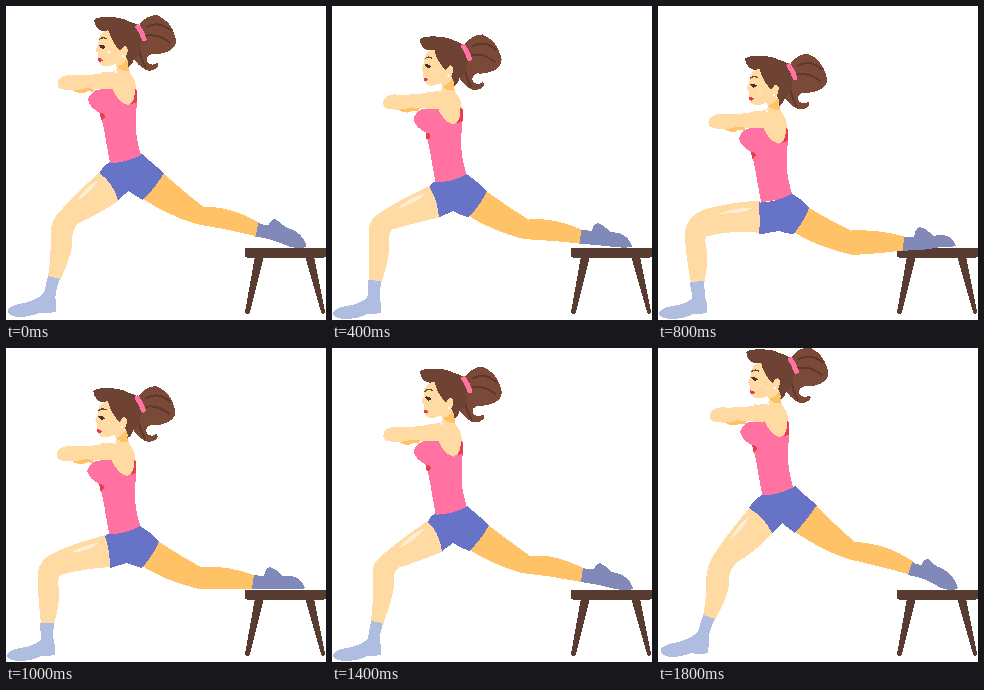
Recreate the animation shown at these times as an HTML page. Size 320 by 314 pixels, loop 2000 ms.

```html
<!DOCTYPE html>
<html>
<head>
<meta charset="utf-8">
<style>
  html, body { margin: 0; width: 100%; height: 100%; overflow: hidden; background: #fff; }
  svg { display: block; width: 320px; height: 314px; shape-rendering: crispEdges; }
</style>
</head>
<body>
<svg viewBox="0 0 320 314">
  <g fill="#583b31">
    <path d="M249 250H258L244 306Q241 310 239 306ZM299 250H308L319 306Q317 310 315 306Z"/>
    <rect x="238.500" y="242" width="81.500" height="9.500" rx="2"/>
  </g>
  <g id="legs"></g>
  <g id="torso">
    <path fill="#ffdaa3" d="M108 54L123 52Q121 64 126 70Q132 76 130 100L94 104L96 66Q110 68 111 62Z"/>
    <path fill="#ffc266" d="M112 60Q120 58 122 49L125 52Q122 62 123 65Q117 66 112 62Z"/>
    <path fill="#ff72a2" d="M90 84Q83 88 82 94Q84 102 94 107L95 111Q98 121 100 135L104 157Q120 157 135 149Q131 136 130 125Q129 110 131 96L130 83Q129 96 122 99Q112 97 106 82Z"/>
    <path fill="#e83e50" d="M129 83L131 84V96L125 98Q129 94 129 83ZM94 107Q99 107 99 111Q97 114 95 114Z"/>
    <path fill="#ffc266" d="M64 82L90 80L87 86Q82 84 78 87Q71 88 64 82Z"/>
    <path fill="#ffdaa3" d="M52 76Q52 71 62 69Q82 70 97 67Q107 65 116 65Q126 69 128 76L110 83Q96 84 80 82Q67 86 55 83Q50 80 52 76Z"/>
    <path fill="#7b4937" d="M134 18Q141 9 151 9Q165 15 169 30Q173 39 163 45Q154 49 146 48Q140 50 141 55Q145 61 151 57Q154 59 151 62Q146 66 140 64Q132 60 126 50L130 30Z"/>
    <path fill="none" stroke="#60382b" stroke-width="2" d="M140 21Q154 14 165 25M139 30Q153 27 164 37M133 38Q133 50 140 62"/>
    <path fill="#6f4333" d="M88 14Q90 11 102 11Q115 11 122 15Q131 18 135 21Q137 32 134 46Q132 52 128 52Q127 59 122 61Q124 56 118 49Q105 45 100 25Q90 26 88 14Z"/>
    <path fill="#ffdaa3" d="M99 25Q94 27 93 33Q93 38 90 43Q90 46 92 47Q91 55 95 59Q100 62 109 58Q119 55 121 48Q123 41 119 40L114 42Q106 32 105 23Z"/>
    <path fill="#6f4333" d="M98 21L108 21Q110 35 118 40L114 45Q105 35 103 25Z"/>
    <path fill="none" stroke="#744536" stroke-width="1.300" d="M93 34Q96 30 101 33"/>
    <path fill="#4b302c" d="M93 39Q97 38 100 41L97 43Q94 42 93 39Z"/>
    <path fill="#e8365c" d="M92 52Q95 52 97 54Q95 57 92 55Z"/>
    <path fill="none" stroke="#ff72a2" stroke-width="5" stroke-linecap="round" d="M132 21Q136 26 138 33"/>
    <g fill="#fff"><circle cx="117" cy="50" r="1.200"/><circle cx="110" cy="66" r="1"/><circle cx="103" cy="46" r=".8"/></g>
  </g>
</svg>
<script>
// Each part has one outline for the high, middle and low pose.
const parts = [
  ["#ffc266",
    "M140 150L158 157Q179 179 197 194Q228 195 256 214L250 226Q221 218 190 211Q163 202 137 184Z",
    "M138 170L156 177Q180 195 198 208Q222 205 251 220L249 234Q220 228 190 225Q161 217 136 201Z",
    "M135 190L152 193Q176 209 195 219Q220 217 248 227L247 241Q221 241 193 241Q157 232 135 217Z"],
  ["#8189b8",
    "M254 214Q260 217 264 217Q265 211 271 211Q276 218 283 220Q296 226 300 240Q296 244 283 240Q268 230 250 227Z",
    "M251 220Q258 222 262 221Q263 216 268 215Q274 218 280 224Q298 227 301 241Q296 243 283 241Q266 236 249 234Z",
    "M248 227Q254 228 258 228Q259 220 264 219Q270 221 277 228Q294 226 299 240Q296 242 283 241Q264 242 246 241Z"],
  ["#ffdaa3",
    "M93 158Q66 190 55 208Q49 217 48 232Q49 248 45 268L57 272Q72 245 71 232Q71 222 78 215Q97 204 116 184L112 160Z",
    "M97 172Q62 196 46 211Q40 217 41 226Q42 245 39 274L51 276Q61 250 62 237Q60 226 66 220Q88 213 112 203L114 180Z",
    "M100 187Q62 197 44 207Q34 212 32 224Q31 240 35 276L48 276Q54 255 53 241Q51 232 54 227Q80 220 106 219L110 195Z"],
  ["#ffeed6",
    "M72 192Q79 177 91 169Q85 182 72 192Z",
    "M67 200Q78 186 93 180Q84 193 67 200Z",
    "M64 205Q78 196 93 195Q84 203 64 205Z"],
  ["#aebde0",
    "M45 267L57 271Q49 287 51 294L50 305Q42 307 33 305Q24 309 12 309Q2 308 3 301Q6 296 21 294Q35 289 40 284Z",
    "M39 273L51 275Q46 292 49 297L49 307Q43 308 35 308Q26 313 12 313Q0 312 1 306Q4 301 20 299Q33 295 36 290Z",
    "M34 275L48 275Q46 292 49 297L49 307Q43 308 35 308Q26 313 12 313Q0 312 1 306Q4 301 20 299Q32 296 35 291Z"],
  ["#6673c6",
    "M105 146Q122 146 137 138Q145 146 159 157Q149 172 137 185Q130 180 124 175L114 185Q107 170 91 160Q96 152 105 146Z",
    "M104 165Q119 165 135 158Q145 166 157 177Q150 191 137 203Q129 200 121 195L110 203Q107 184 96 174Q98 168 104 165Z",
    "M103 186Q118 186 134 178Q143 183 153 193Q150 203 136 220Q128 218 121 215L104 220Q104 203 99 188Q100 186 103 186Z"]
];

const legs = document.getElementById("legs");
const torso = document.getElementById("torso");
const numbers = path => path.match(/\d+/g).map(Number);

const shapes = parts.map(([fill, ...poses]) => {
  const node = document.createElementNS("http://www.w3.org/2000/svg", "path");
  node.setAttribute("fill", fill);
  legs.append(node);
  return { node, template: poses[0], keys: poses.map(numbers) };
});

// The poses lie at depths 0, 2 and 4; the deepest one continues the last line.
function pose(depth) {
  const first = depth < 2 ? 0 : 1;
  const part = depth / 2 - first;
  for (const { node, template, keys } of shapes) {
    const from = keys[first], to = keys[first + 1];
    let i = 0;
    node.setAttribute("d", template.replace(/\d+/g, () => from[i] + (to[i] - from[i++]) * part));
  }
  torso.setAttribute("transform", `translate(${-0.25 * (depth - 1)} ${9.7 * (depth - 1)})`);
}

function draw() {
  const step = Math.floor(performance.now() / 200) % 10;
  pose(5 - Math.abs(step - 4));
  requestAnimationFrame(draw);
}
draw();
</script>
</body>
</html>
```
